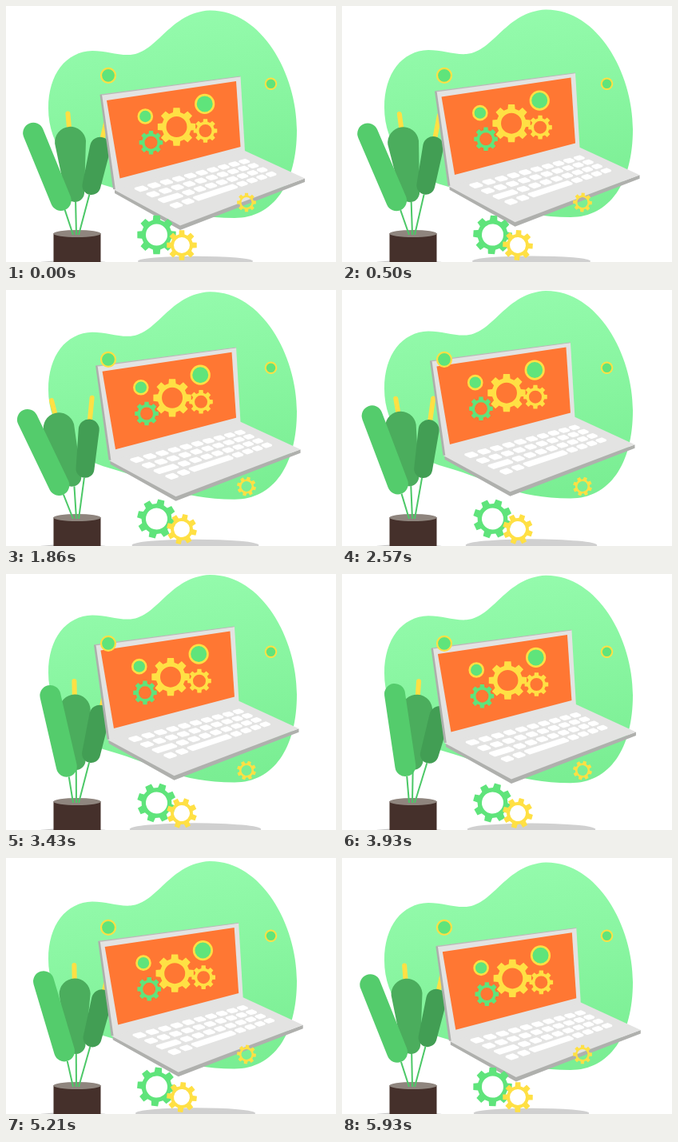
These frames come from a looping animation (413 by 320 pixels, 6 s). An HTML page:

```html
<!DOCTYPE html>
<html lang="en">
<head>
<meta charset="utf-8">
<title>Laptop and gears</title>
<style>
html, body { margin: 0; width: 100%; height: 100%; overflow: hidden; background: #fff; }
svg { display: block; width: 100vw; height: 100vh; }
</style>
</head>
<body>
<svg id="stage" viewBox="0 0 413 320">
  <defs>
    <linearGradient id="mint" x1=".4" y1="0" x2=".6" y2="1">
      <stop offset="0" stop-color="#95fbad"/>
      <stop offset=".5" stop-color="#88f5a0"/>
      <stop offset="1" stop-color="#7aee93"/>
    </linearGradient>
  </defs>
  <path id="blob" fill="url(#mint)" d="M53 128C53 85 75 57 108 56C125 56 140 62 156 61C190 58 205 8 255 5.5C320 5 364 85 364 155C364 222 335 265 286 265C215 265 190 243 130 226C85 215 53 175 53 128Z"/>
  <ellipse id="shadow" cx="237" cy="319" fill="#d0d0d0"/>
  <ellipse cx="84" cy="321" rx="43" ry="3" fill="#c8c8c8"/>
  <g id="plant"></g>
  <path d="M59.5 284H118.5V320H59.5Z" fill="#45302b"/>
  <ellipse cx="89" cy="284.5" rx="29.5" ry="4.5" fill="#8f857e"/>
  <g id="stems" fill="none" stroke="#4cc867" stroke-width="2"></g>
  <g id="laptop">
    <path d="M136 229L218 273L374 215.5V220L218 280L136 234Z" fill="#afb0ad"/>
    <path d="M134 229L299 181L374 215.5L218 274.5Z" fill="#e3e3e2"/>
    <path d="M117.5 111L121 110L139 229L134 229Z" fill="#adafac"/>
    <path d="M120 110.6L293.5 88L299 182L137 230Z" fill="#e3e3e2"/>
    <path d="M117.5 110.6L293.5 87.6L293.5 88.6L121 111.6Z" fill="#b9bbb8"/>
    <path d="M126 117.9L288 93.9L293.5 175.9L142.5 215.4Z" fill="#ff7733"/>
    <g id="keys" fill="#fff" stroke="#fff" stroke-width="3" stroke-linejoin="round"></g>
  </g>
  <g id="extras"></g>
</svg>
<script>
const LOOP = 6000, YELLOW = '#ffe044', GREEN = '#5fe47b', TURN = 22.5;
const $ = id => document.getElementById(id);
const laptop = $('laptop'), extras = $('extras'), plant = $('plant');

function add(parent, tag, attrs) {
  const el = document.createElementNS('http://www.w3.org/2000/svg', tag);
  for (const k in attrs) el.setAttribute(k, attrs[k]);
  return parent.appendChild(el);
}

// Keyboard: rows of relative key widths spread over a quadrilateral
function keyPoint(u, v) {
  u = u * (1.14 - .14 * u);
  const mix = (a, b, c, d) => (a * (1 - u) + b * u) * (1 - v) + (c * (1 - u) + d * u) * v;
  return mix(154, 299, 213, 343).toFixed(1) + ' ' + mix(227, 190, 255, 211).toFixed(1);
}
const ones = n => Array(n).fill(1);
[ones(10), ones(10), [2, ...ones(8)], [1, 1, 4, ...ones(4)]].forEach((row, r) => {
  let x = 0;
  for (const w of row) {
    const a = (x + .24) / 10, b = (x + w - .24) / 10, c = (r + .3) / 4, d = (r + .7) / 4;
    add($('keys'), 'path', { d: `M${keyPoint(a, c)}L${keyPoint(b, c)}L${keyPoint(b, d)}L${keyPoint(a, d)}Z` });
    x += w;
  }
});

function dot(parent, cx, cy, r, w) {
  add(parent, 'circle', { cx, cy, r, fill: GREEN, stroke: YELLOW, 'stroke-width': w });
}
const gears = [];
function gear(parent, x, y, outer, body, hole, fill, turn) {
  const pts = [];
  for (let i = 0; i < 8; i++)
    for (const [r, da] of [[body, -.25], [outer, -.17], [outer, .17], [body, .25]]) {
      const a = i * Math.PI / 4 + da;
      pts.push((r * Math.cos(a)).toFixed(2) + ' ' + (r * Math.sin(a)).toFixed(2));
    }
  const d = `M${pts.join('L')}ZM${hole} 0A${hole} ${hole} 0 1 0 ${-hole} 0A${hole} ${hole} 0 1 0 ${hole} 0Z`;
  gears.push({ el: add(parent, 'path', { d, fill, 'fill-rule': 'evenodd' }), x, y, turn });
}
gear(laptop, 213.5, 151, 24, 18.5, 13, YELLOW, 0);
gear(laptop, 181.5, 170.7, 15, 11.5, 8, GREEN, 0);
gear(laptop, 249.5, 156, 15, 11.5, 8, YELLOW, 0);
dot(laptop, 174.3, 138, 8.5, 2.6);
dot(laptop, 248.7, 122.4, 11.3, 2.6);
dot(extras, 128, 86.8, 9, 2.2);
dot(extras, 331.5, 97.3, 6.8, 2);
gear(extras, 188.5, 286, 24.5, 19, 13.5, GREEN, TURN);
gear(extras, 220, 299, 19, 14, 10, YELLOW, TURN);
gear(extras, 301, 245.5, 12, 9, 6.5, YELLOW, TURN);

// Leaf: upright tapered capsule above its pivot; caps at heights hi and lo
function leaf(x, y, hi, lo, R, r, fill, tip, keys, stemX) {
  const el = add(plant, 'g', {});
  if (tip) add(el, 'path', { d: `M0 ${-tip}V${-hi}`, stroke: YELLOW, 'stroke-width': 6, 'stroke-linecap': 'round' });
  add(el, 'path', { d: `M${-R} ${-hi}A${R} ${R} 0 0 1 ${R} ${-hi}L${r} ${-lo}A${r} ${r} 0 0 1 ${-r} ${-lo}Z`, fill });
  return { el, x, y, end: lo - r, keys, stemX, stem: add($('stems'), 'path', {}) };
}
const leaves = [
  leaf(88, 255, 85, 22, 19.5, 12, '#4bad5d', 121, [-5, -15.6, 4.5], 88),
  leaf(86, 285, 136.5, 45.5, 13, 13, '#54cc6c', 0, [-22.3, -25.9, -7.8], 84),
  leaf(93, 285, 111, 62, 13, 11.5, '#429e54', 151, [13, 5, 15.7], 91)
];

function sway(keys, t) {
  const p = t / LOOP * 3, i = Math.floor(p) % 3;
  return keys[i] + (keys[(i + 1) % 3] - keys[i]) * (p - Math.floor(p));
}

function draw(now) {
  const t = now % LOOP, lift = 1 - Math.abs(1 - t / 3000);
  $('blob').setAttribute('transform', `translate(0 ${-5.3 * lift})`);
  laptop.setAttribute('transform', `translate(${-8.8 * lift} ${-26.1 * lift})`);
  $('shadow').setAttribute('rx', 72 + 12 * lift);
  $('shadow').setAttribute('ry', 6.3 + 1.6 * lift);
  for (const g of gears)
    g.el.setAttribute('transform', `translate(${g.x} ${g.y}) rotate(${g.turn * lift})`);
  for (const l of leaves) {
    const deg = sway(l.keys, t), a = deg * Math.PI / 180;
    l.el.setAttribute('transform', `translate(${l.x} ${l.y}) rotate(${deg})`);
    l.stem.setAttribute('d', `M${l.stemX} 286L${l.x + l.end * Math.sin(a)} ${l.y - l.end * Math.cos(a)}`);
  }
  requestAnimationFrame(draw);
}
requestAnimationFrame(draw);
</script>
</body>
</html>
```
